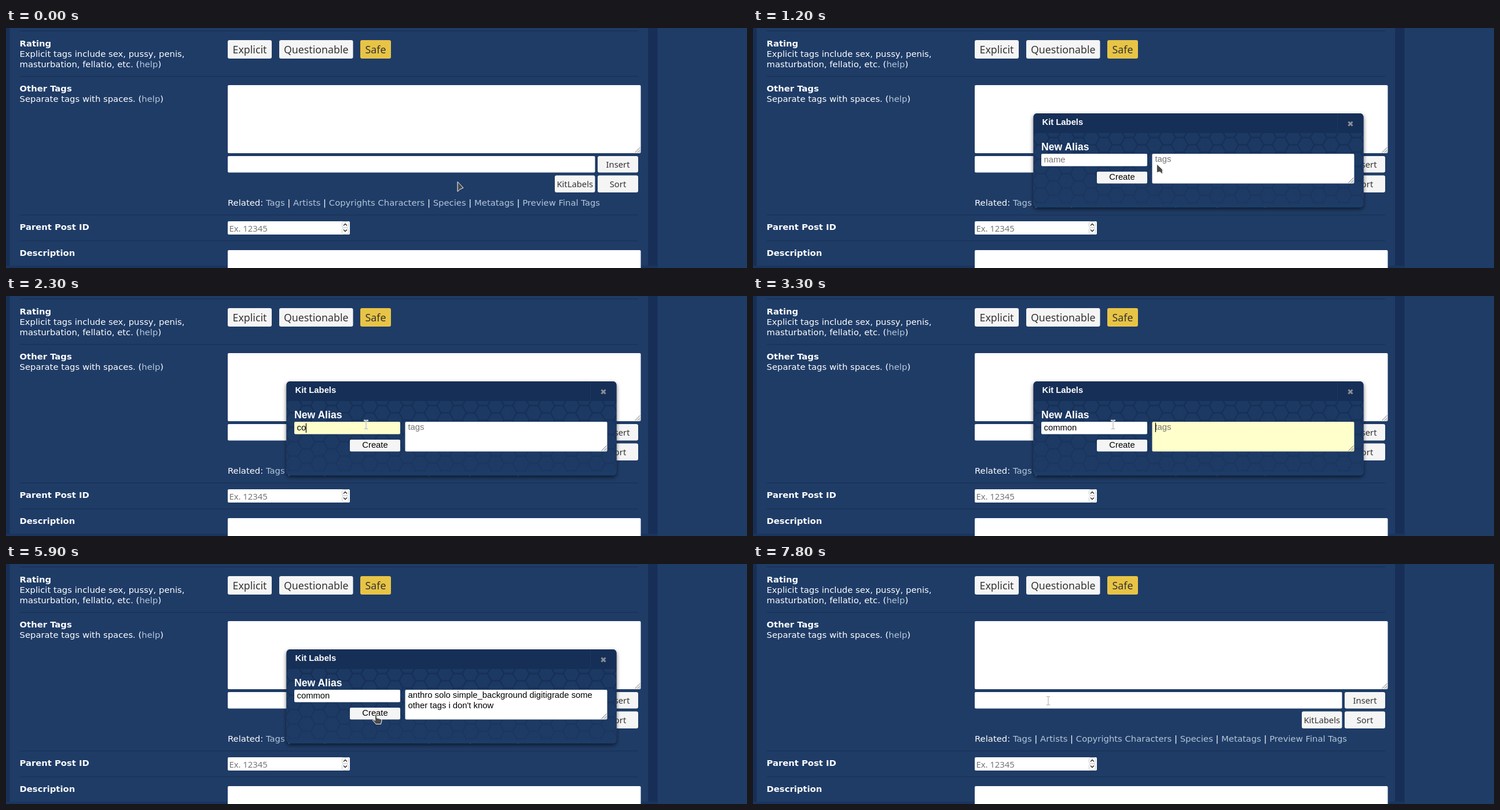
An HTML page for the animation above (8000 ms loop, 1280 by 416 pixels).

```html
<!DOCTYPE html>
<html lang="en">
<head>
<meta charset="utf-8">
<title>Tag form</title>
<style>
  html, body { margin: 0; width: 100%; height: 100%; overflow: hidden; background: #1f3c67; }
  svg { display: block; width: 100%; height: 100%; }
  text { white-space: pre; font-size: 14.8px; }
  .page { font-family: "DejaVu Sans", sans-serif; fill: #fff; }
  .ui { font-family: "Noto Sans", sans-serif; fill: #333; }
  .pop { font-family: "Liberation Sans", Arial, sans-serif; fill: #000; }
  .bold { font-weight: bold; }
  .mid { text-anchor: middle; }
  .big { font-size: 17.76px; }
  .head { font-size: 17.6px; }
  .item { font-size: 12.3px; }
  .link { fill: #b4c7d9; }
  .white { fill: #fff; }
  .hint { fill: #757575; }
  .cursor { fill: #4a4a4a; stroke: #fff; stroke-width: 1; stroke-linejoin: round; }
</style>
</head>
<body>
<svg id="stage" viewBox="0 0 1280 416" xmlns="http://www.w3.org/2000/svg"></svg>
<script>
const LOOP = 8000, STEP = 100;
const TITLE = 'Kit Labels';
const TAGS = ['anthro solo simple_background digitigrade some', "other tags i don't know"];

const box = (x, y, x2, y2, fill, r = 0, extra = '') =>
  `<rect x="${x}" y="${y}" width="${x2 - x}" height="${y2 - y}" rx="${r}" fill="${fill}" ${extra}/>`;
const text = (x, y, cls, str, extra = '') =>
  `<text x="${x}" y="${y}" class="${cls}" ${extra}>${str}</text>`;
const button = (x, y, x2, y2, label, base, cls = 'ui', fill = '#f5f5f5', r = 3) =>
  box(x, y, x2, y2, fill, r) + text((x + x2) / 2, base, cls + ' mid', label);
const stroke = (d, color, width = 1) =>
  `<path d="${d}" fill="none" stroke="${color}" stroke-width="${width}"/>`;
const grip = (x, y) => stroke(
  `M${x - 10} ${y - 1}L${x - 1} ${y - 10}M${x - 6} ${y - 1}L${x - 1} ${y - 6}M${x - 3} ${y - 1}L${x - 1} ${y - 3}`, '#666');
const area = (x, y, x2, y2, id = '') =>
  box(x, y, x2, y2, '#fff', 2, id && `id="${id}"`) + grip(x2, y2);
const help = '(<tspan class="link">help</tspan>)';

function page() {
  const links = ['Tags', 'Artists', 'Copyrights Characters', 'Species', 'Metatags', 'Preview Final Tags']
    .map(s => `<tspan class="link">${s}</tspan>`).join(' | ');
  return box(0, 0, 1280, 416, '#1f3c67') +
    box(0, 0, 6.5, 416, '#172f56') + box(1109, 0, 1125.5, 416, '#172f56') +
    box(0, 412, 1125, 416, '#1a355e') +
    [5, 84, 324, 369].map(y => box(24, y - 0.5, 1092, y + 0.5, '#162e53')).join('') +
    text(23.5, 32, 'page bold', 'Rating') +
    text(23.5, 50, 'page', 'Explicit tags include sex, pussy, penis,') +
    text(23.5, 68, 'page', 'masturbation, fellatio, etc. ' + help) +
    text(23.5, 110, 'page bold', 'Other Tags') +
    text(23.5, 128, 'page', 'Separate tags with spaces. ' + help) +
    text(23.5, 350, 'page bold', 'Parent Post ID') +
    text(23.5, 395, 'page bold', 'Description') +
    button(383, 21, 459, 53, 'Explicit', 43.5, 'ui big') +
    button(472, 21, 599.5, 53, 'Questionable', 43.5, 'ui big') +
    button(612, 21, 665, 53, 'Safe', 43.5, 'ui big', '#e8c446') +
    area(383, 99, 1096.5, 217) +
    box(383, 222, 1017.5, 250.5, '#fff', 2) +
    button(1022, 222, 1092, 250.5, 'Insert', 241.7) +
    button(948, 255.5, 1017.5, 285, TITLE.replace(' ', ''), 276) +
    button(1022, 255.5, 1092, 285, 'Sort', 276) +
    text(383, 308, 'page', 'Related: ' + links) +
    box(383, 335, 594, 358, '#fff', 2) +
    text(385.5, 352.5, 'ui hint', 'Ex. 12345') +
    box(580.5, 335.5, 591.5, 346, '#fff', 3, 'stroke="#ccc"') +
    box(580.5, 346.5, 591.5, 357, '#fff', 3, 'stroke="#ccc"') +
    stroke('M583 342.5L586 339.5 589 342.5M583 349.5L586 352.5 589 349.5', '#222', 1.3) +
    box(383, 385, 1096.5, 420, '#fff', 2);
}

function dropdown() {
  const items = ['Enhancement', 'Feature', 'Priority: MEDIUM', 'Enhacement', 'Fixme', 'Priority: High'];
  return '<g id="list">' +
    box(498.5, 239.5, 680, 351, '#2a2e32', 0, 'stroke="#6c6f72"') +
    items.map((s, i) => text(504, 255.5 + i * 18.15, 'ui item white', s)).join('') +
    box(665, 255, 674, 334, '#65696c', 4.5) + box(665, 255, 674, 282.5, '#a5a8aa', 4.5) +
    stroke('M666 248L669 245 672 248M666 341.5L669 344.5 672 341.5', '#fff', 1.2) + '</g>';
}

function popup() {
  return '<g id="popup">' +
    box(484.5, 148, 1054.5, 311, '#1f3c67', 6, 'id="shell" filter="url(#shadow)"') +
    box(484.5, 181, 1054.5, 305, 'url(#hex)', 0, 'id="cells"') +
    box(484.5, 181, 1054.5, 305, 'url(#fade)', 0, 'id="veil"') +
    '<path d="M484.5 182V154a6 6 0 0 1 6 -6H1048.500a6 6 0 0 1 6 6V182Z" fill="#162f57"/>' +
    box(1009, 149, 1010, 182, '#1c365e') +
    text(499.5, 168, 'pop bold white', TITLE) +
    stroke('M1028.500 162.500L1035.500 169.500M1035.500 162.500L1028.500 169.500', '#8b8f96', 3) +
    text(498, 212, 'pop bold head white', 'New Alias') +
    box(498, 218, 681, 239.5, '#fff', 2, 'id="nameBox"') +
    text(502.5, 233, 'pop', '', 'id="name"') +
    button(594, 249, 681, 269.5, 'Create', 263, 'pop', '#f5f5f5', 2) +
    area(689.5, 218, 1038.5, 269.5, 'tagsBox') +
    text(694.5, 232, 'pop', '', 'id="tags"') + text(694.5, 250, 'pop', '', 'id="tags2"') +
    '<g id="row">' +
    text(502.5, 310, 'pop bold white', 'common') +
    button(498, 326, 585, 347.5, 'Delete', 341, 'pop', '#f5f5f5', 2) +
    button(594, 326, 681, 347.5, 'Update', 341, 'pop', '#f5f5f5', 2) +
    area(689.5, 296, 1038.5, 348) +
    text(694.5, 310, 'pop', TAGS[0]) + text(694.5, 328, 'pop', TAGS[1]) + '</g>' +
    '<rect id="caret" width="1.2" height="16.500"/>' + dropdown() + '</g>';
}

const defs = `<defs>
  <filter id="shadow" x="-5%" y="-10%" width="110%" height="125%">
    <feDropShadow dx="0" dy="3" stdDeviation="3.500" flood-color="#000" flood-opacity=".6"/>
  </filter>
  <pattern id="hex" x="606.2" y="177.5" width="43.6" height="25" patternUnits="userSpaceOnUse">
    <rect width="43.6" height="25" fill="#1c3963"/>
    ${stroke('M0 12.5H7.3L14.55 0H29.05L36.3 12.5H43.6M7.3 12.5L14.55 25H29.05L36.3 12.5', '#152e55', 2.4)}
  </pattern>
  <linearGradient id="fade" gradientUnits="userSpaceOnUse" x1="0" y1="182" x2="0" y2="370">
    <stop offset="0" stop-color="#1f3c67" stop-opacity="0"/>
    <stop offset="1" stop-color="#1f3c67"/>
  </linearGradient></defs>`;

// Each pointer is drawn around its hot spot.
const shapes = {
  arrow: 'M0 -.5V16.5L4 12.800 10 10Z',
  lean: 'M0 0V15L5.500 13.500 10 18V9.500Z',
  beam: 'M-3.500 -8H-.9L0 -7.3 .9 -8H3.500V-6.600H.8V6.600H3.500V8H.9L0 7.3 -.9 8H-3.500V6.600H-.8V-6.600H-3.500Z',
  point: 'M-1.500 0Q0 -1.600 1.500 0V6L8 7.500Q10.500 8 10 11L8.500 16.500H0L-5.500 10Q-5 8 -3 9L-1.500 10.500Z',
  grab: 'M-4.500 10L-9.500 3Q-9.500 .5 -7 1.500L-5 3.500 -6.500 -6.500Q-5 -9 -3.800 -6.500L-2.500 -2 -2 -9.500Q-.2 -12 .8 -9.500L1.200 -2.500 3 -9.500Q5 -11 5.300 -8.500L4.800 -1.500 6.500 -6Q8.800 -7 8.500 -4.500L7 5.500 5.500 10Z'
};
// time, x, y, pointer shape
const path = [
  [0, 780, 267, 'arrow'], [100, 780, 267, 'arrow'], [500, 896, 246, 'beam'], [700, 950, 254, 'beam'],
  [900, 962, 268, 'beam'], [1000, 850, 259, 'lean'], [1300, 621, 224, 'lean'], [1900, 621, 224, 'lean'],
  [2000, 622, 223, 'beam'], [4200, 622, 223, 'beam'], [4600, 634, 203, 'lean'], [4900, 645, 188, 'lean'],
  [5100, 645, 188, 'lean'], [5400, 643, 232, 'lean'], [5600, 640, 257, 'point'], [5700, 639, 261, 'point'],
  [6400, 639, 261, 'point'], [6800, 1029, 160, 'grab'], [7000, 1129, 180, 'arrow'], [7200, 1050, 168, 'grab'],
  [7300, 1031, 165, 'point'], [7500, 1031, 165, 'point'], [7800, 510, 237, 'beam'], [LOOP, 510, 237, 'beam']
];
const typing = [[2000, 1], [2300, 2], [2600, 4], [2900, 5], [3000, 6]];

document.getElementById('stage').innerHTML =
  defs + page() + popup() + '<path id="cursor" class="cursor"/>';
const el = {};
for (const node of document.querySelectorAll('#stage [id]')) el[node.id] = node;
const set = (id, name, value) => el[id].setAttribute(name, value);
const show = (id, on) => set(id, 'visibility', on ? 'visible' : 'hidden');

function field(id, value, hint) {
  el[id].textContent = value || hint;
  el[id].classList.toggle('hint', !value);
}

function drawCursor(t) {
  let i = path.length - 1;
  while (path[i][0] > t) i--;
  const a = path[i], b = path[i + 1] || a;
  const k = b === a ? 0 : (t - a[0]) / (b[0] - a[0]);
  set('cursor', 'd', shapes[a[3]]);
  set('cursor', 'transform', `translate(${a[1] + (b[1] - a[1]) * k} ${a[2] + (b[2] - a[2]) * k})`);
}

function drawCaret(t, typed, pasted) {
  const inName = t >= 1600 && t < 3300, inTags = t >= 3300 && t < 5900;
  const blink = t < 4300 || Math.floor((t - 4000) / 500) % 2 === 0;
  const open = (inName || inTags) && blink;
  el.caret.style.display = open ? '' : 'none';
  set('nameBox', 'fill', inName ? '#ffffcc' : '#fff');
  set('tagsBox', 'fill', inTags ? '#ffffcc' : '#fff');
  if (!open) return;
  const line = inName ? el.name : el.tags2;
  const filled = inName ? typed : pasted;
  const start = inName ? 502.2 : 694.8;
  set('caret', 'x', start + (filled ? line.getComputedTextLength() : 0));
  set('caret', 'y', inName ? 220.5 : pasted ? 237.5 : 219.5);
}

function draw(ms) {
  const t = Math.floor((ms % LOOP) / STEP) * STEP;
  const saved = t >= 6000;
  el.popup.style.display = t >= 1000 && t < 7600 ? '' : 'none';
  el.row.style.display = saved ? '' : 'none';
  const height = saved ? 232 : 163;
  set('shell', 'height', height);
  for (const id of ['cells', 'veil']) set(id, 'height', height - 39);

  const count = saved ? 0 : typing.reduce((n, [at, c]) => t >= at ? c : n, 0);
  const pasted = t >= 4000 && !saved;
  field('name', 'common'.slice(0, count), 'name');
  field('tags', pasted ? TAGS[0] : '', 'tags');
  el.tags2.textContent = pasted ? TAGS[1] : '';

  const fading = t === 1700 || t === 2100;
  el.list.style.display = t >= 1700 && t < 2200 ? '' : 'none';
  set('list', 'opacity', fading ? 0.5 : 1);
  drawCaret(t, count, pasted);
  drawCursor(t);
}

const begin = performance.now();
function tick() {
  draw(performance.now() - begin);
  requestAnimationFrame(tick);
}
draw(0);
requestAnimationFrame(tick);
</script>
</body>
</html>
```
